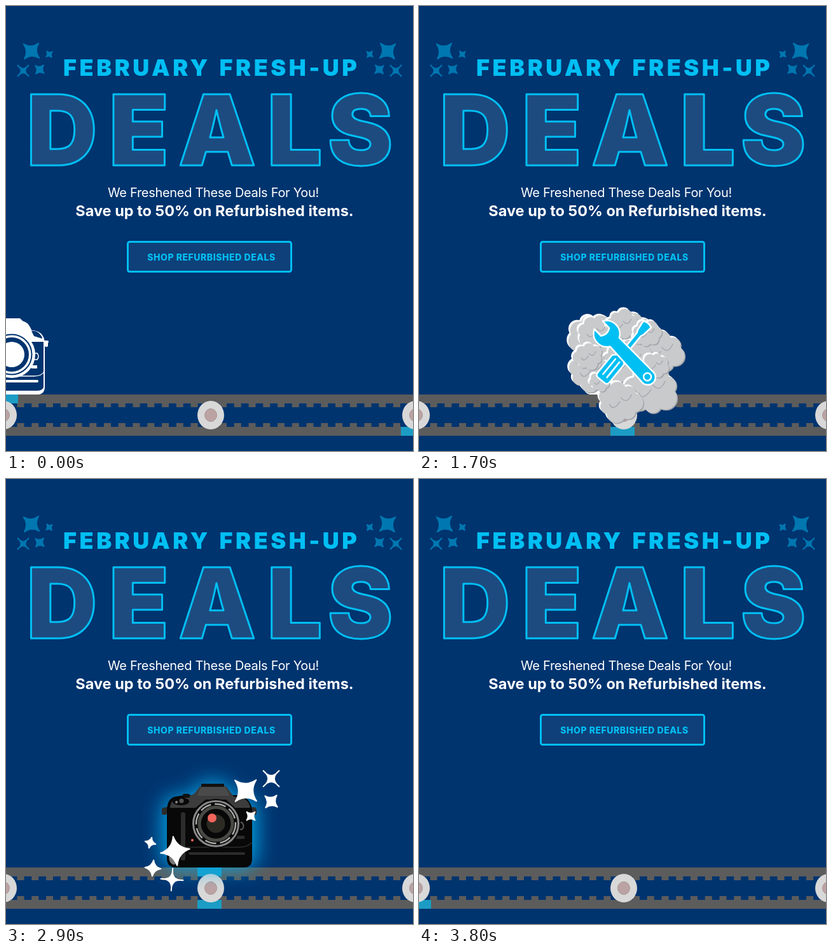
Recreate the animation shown at these times as an HTML page. Size 640 px wide and 701 px high, loop 4 s.

```html
<!DOCTYPE html>
<html lang="en">
<head>
<meta charset="utf-8">
<title>February Fresh-Up Deals</title>
<style>
  html, body { margin: 0; width: 100%; height: 100%; overflow: hidden; background: #00346f; }
  svg { display: block; width: 640px; height: 701px; }
  text { font-family: Inter, "Open Sans", sans-serif; text-anchor: middle; }
  .deals { font-size: 154px; font-weight: 900; font-optical-sizing: none; fill: #1d4b80; stroke: #00bff3; stroke-width: 3; stroke-linejoin: round; }
  .kicker { font-size: 36px; font-weight: 900; letter-spacing: 4.5px; fill: #00bff3; }
  .lead { font-size: 20px; font-weight: 400; letter-spacing: -.3px; fill: #fff; }
  .offer { font-size: 23.5px; font-weight: 700; fill: #fff; }
  .cta { font-size: 14px; font-weight: 800; letter-spacing: .55px; fill: #00bff3; }
</style>
</head>
<body>
<svg id="stage" viewBox="0 0 640 701"></svg>
<script>
const NAVY = '#00346f', CYAN = '#00bff3', GRAY = '#5c5c5c', PAD = '#1c9cc4';
const LOOP = 4000;

const range = n => [...Array(n).keys()];
const group = (id, body, attrs = '') => `<g id="${id}" ${attrs}>${body}</g>`;
const path = (d, attrs = '') => `<path d="${d}" ${attrs}/>`;
const disc = (x, y, r, fill, attrs = '') => `<circle cx="${x}" cy="${y}" r="${r}" fill="${fill}" ${attrs}/>`;
const box = (x, y, w, h, fill, r = 0, attrs = '') =>
  `<rect x="${x}" y="${y}" width="${w}" height="${h}" rx="${r}" fill="${fill}" ${attrs}/>`;
const line = (color, width) => `fill="none" stroke="${color}" stroke-width="${width}" stroke-linecap="round"`;

// Four-pointed star; a lower waist gives thinner arms.
function star(x, y, r, turn, waist = .25) {
  const at = (deg, len) => {
    const a = (turn + deg) * Math.PI / 180;
    return `${(x + len * Math.cos(a)).toFixed(1)} ${(y + len * Math.sin(a)).toFixed(1)}`;
  };
  const sides = range(4).map(i => `Q${at(i * 90 + 45, r * waist)} ${at(i * 90 + 90, r)}`);
  return path(`M${at(0, r)}${sides.join('')}Z`, 'stroke="currentColor" stroke-width="2" stroke-linejoin="round"');
}

function heading() {
  const stars = star(40, 71, 16.5, 42) + star(68, 76, 6, 50) + star(53, 100, 9, 42) + star(27, 102, 12, 45, -.15);
  const letters = [['D', 88], ['E', 209], ['A', 332], ['L', 454], ['S', 557]];
  return `<g fill="#0077b0" color="#0077b0">${stars}<g transform="matrix(-1 0 0 1 640 0)">${stars}</g></g>
    <text class="kicker" x="206" y="110">FEBRUARY</text>
    <text class="kicker" x="446" y="110">FRESH-UP</text>
    <text class="deals" y="250.5">${letters.map(([c, x]) => `<tspan x="${x}">${c}</tspan>`).join('')}</text>
    <text class="lead" x="326" y="301">We Freshened These Deals For You!</text>
    <text class="offer" x="328" y="331">Save up to 50% on Refurbished items.</text>
    ${box(191.5, 371.5, 257, 47, '#0f4079', 3, `stroke="${CYAN}" stroke-width="3"`)}
    <text class="cta" x="323" y="401">SHOP REFURBISHED DEALS</text>`;
}

function belt() {
  const teeth = range(30).map(i => {
    const x = -5.25 + i * 22.75;
    return box(x, 626, 11, 6, GRAY) + box(x, 657, 11, 6, GRAY);
  }).join('');
  const rollers = [-4, 322, 644].map(x =>
    `<ellipse cx="${x}" cy="644.5" rx="21" ry="22.5" fill="#d8d8d8"/>
     <ellipse cx="${x}" cy="644.5" rx="9.5" ry="10" fill="#bca3a3" stroke="#a89494"/>`).join('');
  return box(0, 612, 640, 14, GRAY) + box(0, 663, 640, 14, GRAY) + teeth +
    group('topPad', box(-19, 612, 38, 14, PAD)) +
    group('lowPad', box(-19, 663, 38, 14, PAD)) + rollers;
}

function plainCamera() {
  const white = '#fff';
  return box(-67, 527, 134, 4, white, 2) + box(-66, 528, 5, 9, white, 2) + box(61, 528, 5, 9, white, 2) +
    path('M-59 530Q-60 511 -48 510H-25L-5 512H40Q58 512 60 530V600Q60 611 48 611H-48Q-59 611 -59 600Z',
      `fill="${NAVY}" stroke="#fff" stroke-width="2"`) +
    path('M-60 524H-30L-22 505Q-14 497 -6 496L-3 492H22L26 496Q34 498 38 506L44 518L60 524V529H-60Z', 'fill="#fff"') +
    path('M40 512Q52 510 57 524L44 520Z', `fill="${NAVY}"`) +
    `<ellipse cx="-43" cy="518" rx="13" ry="5.5" fill="${NAVY}" transform="rotate(-8 -43 518)"/>` +
    disc(-48, 518, 2, white) + `<ellipse cx="-38" cy="517" rx="4" ry="3" ${line(white, 1.5)}/>` +
    path('M-60 585Q-44 586 -39 601Q-37 606 -28 606H50Q58 606 60 598V602Q60 612 49 612H-48Q-60 612 -60 601Z', 'fill="#fff"') +
    box(-40, 530, 6, 72, white, 3) + box(-30, 589, 81, 4, white, 2) +
    path('M-30 583H44Q56 583 60 576', line(white, 1.3)) +
    path('M45 547H49Q53 552 49 557H45', line(white, 1.5)) + box(40, 566, 9, 5, white) + disc(-24, 572, 1.6, white) +
    disc(9, 549, 37, white) + disc(9, 549, 31.5, 'none', `stroke="${NAVY}" stroke-width="2"`) +
    disc(9, 549, 27, NAVY) + disc(9, 549, 20, white);
}

function freshCamera() {
  const black = '#080808', dark = '#2c2c2c', mid = '#555';
  return box(-75, 518, 8, 11, dark, 3) + box(66, 518, 8, 11, dark, 3) +
    box(-72, 517, 144, 5, dark, 2) +
    path('M-67 520Q-66 502 -52 500L-38 498H46Q63 501 67 520V598Q67 612 54 612H-52Q-67 612 -67 598Z', `fill="${black}"`) +
    path('M-40 503L-24 496L-15 484H26L38 500L55 504Q63 509 64 518H40L26 505H-6L-22 518H-62Q-61 505 -50 503Z', 'fill="#3c3c3c"') +
    path('M-12 484H24L32 499H-20Z', 'fill="#4a4a4a"') +
    box(-13, 480, 36, 5, '#111', 1) + box(-42, 496, 11, 6, '#111', 2) +
    `<ellipse cx="-45" cy="508" rx="13" ry="6" fill="${black}"/>` + disc(-44, 507, 3.5, mid) + disc(-52, 509, 2, '#888') +
    box(-45, 525, 7, 76, dark, 3) + box(-33, 588, 89, 4, dark, 2) +
    path('M-36 580H46Q60 580 66 573', line(dark, 1.5)) + box(42, 562, 13, 5, dark) +
    path('M47 541H51Q56 547 51 552H47', line(mid, 2)) +
    `<ellipse cx="-58" cy="600" rx="5" ry="8" fill="#777" transform="rotate(-25 -58 600)"/>` +
    disc(10, 543, 39, black) +
    disc(10, 543, 35.5, 'none', 'stroke="#888" stroke-width="3"') +
    disc(10, 543, 31, 'none', 'stroke="#aaa" stroke-width="2.5" stroke-dasharray="18 6"') +
    disc(10, 543, 26, 'none', 'stroke="#484844" stroke-width="5"') +
    disc(10, 543, 19, black) + disc(10, 543, 14.5, '#2b2b24') +
    disc(4, 534, 7, '#f0655c') + disc(-27, 569, 2, '#f0655c');
}

function tools() {
  const skin = `fill="${CYAN}" stroke="#fff" stroke-width="2.5" stroke-linejoin="round"`;
  const driver = path('M4 -12H40L47 -4H91L96 -6L112 -8Q116 0 112 8L96 6L91 4H47L40 12H4Q-2 12 -2 7V-7Q-2 -12 4 -12Z', skin) +
    path('M7 -4H38M7 4H38', line('#fff', 2.5));
  const wrench = path('M-17 -9L-2 -9Q4 0 -2 9L-17 9A21 21 0 0 0 20 10L96 12A12 12 0 0 0 96 -12L20 -10A21 21 0 0 0 -17 -9Z', skin) +
    disc(95, 0, 6, CYAN, 'stroke="#fff" stroke-width="2.5"');
  return `<g transform="translate(288 588) rotate(-50.7)">${driver}</g>
    <g transform="translate(294 515) rotate(46.7)">${wrench}</g>`;
}

function puff([x, y, r]) {
  const lobes = range(7).map(i => {
    const a = i * 2 * Math.PI / 7 + x;
    const size = r * (.36 + .06 * Math.sin(i * 2.4 + y));
    const cx = x + .6 * r * Math.cos(a), cy = y + .52 * r * Math.sin(a);
    return `<circle cx="${cx.toFixed(1)}" cy="${cy.toFixed(1)}" r="${size.toFixed(1)}"/>`;
  }).join('') + `<circle cx="${x}" cy="${y}" r="${r * .6}"/>`;
  const layer = (fill, shift) => `<g fill="${fill}" transform="translate(${shift} ${shift})">${lobes}</g>`;
  const curl = (dx, dy, s) => path(`M${x + dx * r} ${y + dy * r}q${s * r} ${.32 * r} ${.45 * r} ${-.12 * r}`, line('#a3a6aa', 1.3));
  return layer('#a3a6aa', 1.5) + layer('#fff', -2.5) + layer('#c9cacc', 0) + curl(-.45, .1, .15) + curl(.05, -.2, .25);
}
const cloud = puffs => puffs.map(puff).join('');

const smokeA = [[272, 520, 39], [330, 516, 40], [380, 545, 38], [328, 562, 42], [270, 575, 36], [365, 605, 44], [316, 624, 36]];
const smokeB = [[278, 514, 30], [320, 502, 27], [358, 516, 24], [372, 566, 22], [266, 552, 24], [284, 592, 17]];
const smokeC = [[305, 471, 12], [336, 471, 12], [354, 473, 11], [391, 499, 13], [262, 497, 17], [284, 487, 15], [355, 500, 18],
  [390, 538, 23], [382, 584, 21], [248, 558, 22], [272, 562, 19], [279, 606, 23], [330, 616, 22], [352, 620, 23]];

const leftStars = star(-54, 586, 23, -8) + star(-93, 573, 8.5, 15) + star(-89, 613, 12.5, 5) + star(-59, 631, 17.5, 4, -.12);
const rightStars = star(57, 491, 23.5, 44) + star(97, 472, 17.5, 45, -.15) + star(97, 508, 13, 42) + star(65, 531, 9, 45);
const halo = box(-73, 500, 146, 113, '#00aeef', 20) + box(-20, 478, 50, 40, '#00aeef', 8);

document.getElementById('stage').innerHTML =
  `<defs><filter id="soft" x="-60%" y="-60%" width="220%" height="220%"><feGaussianBlur stdDeviation="16"/></filter></defs>` +
  box(0, 0, 640, 701, NAVY) + heading() + belt() +
  group('plain', plainCamera()) +
  group('fresh',
    group('glow', halo, 'filter="url(#soft)"') +
    group('body', freshCamera()) +
    group('leftStars', leftStars, 'fill="#fff" color="#fff"') +
    group('rightStars', rightStars, 'fill="#fff" color="#fff"')) +
  group('smokeA', cloud(smokeA)) + group('smokeB', cloud(smokeB)) + group('smokeC', cloud(smokeC)) +
  group('tools', tools());

// Plays [time, value] steps with hard changes, forever.
function play(id, prop, steps, format = v => v) {
  const frames = steps.map(([time, value]) =>
    ({ offset: time / LOOP, [prop]: format(value), easing: 'steps(1, end)' }));
  frames.push({ offset: 1, [prop]: frames[frames.length - 1][prop] });
  document.getElementById(id).animate(frames, { duration: LOOP, iterations: Infinity });
}
const move = (id, steps) => play(id, 'transform', steps, x => `translate(${x}px, 0px)`);
const fade = (id, steps) => play(id, 'opacity', steps);
const show = (id, from, to = LOOP) =>
  fade(id, [[0, 0], [from, 1], ...(to < LOOP ? [[to, 0]] : [])]);

const arrive = range(5).map(i => [i * 300, i * 80]);
const leave = step => range(7).map(i => [3100 + i * 100, 320 + (i + 1) * step]).concat([[3800, 900]]);

move('plain', arrive);
move('fresh', [[0, 320], ...leave(59.5)]);
move('topPad', [...arrive, ...leave(60)]);
move('lowPad', [[0, 640], [300, 560], [900, 396], [1200, 320],
  ...leave(60).map(([time, x]) => [time, Math.max(0, 640 - x)])]);

fade('plain', [[0, 1], [2100, 0]]);
show('tools', 1200, 2300);
show('smokeA', 1500, 2100);
show('smokeB', 1700, 2300);
show('smokeC', 1900, 2700);
show('body', 2300);
fade('glow', [[0, 0], [2500, .45], [2900, .95]]);
show('rightStars', 2700, 3000);
show('leftStars', 2900);
</script>
</body>
</html>
```
